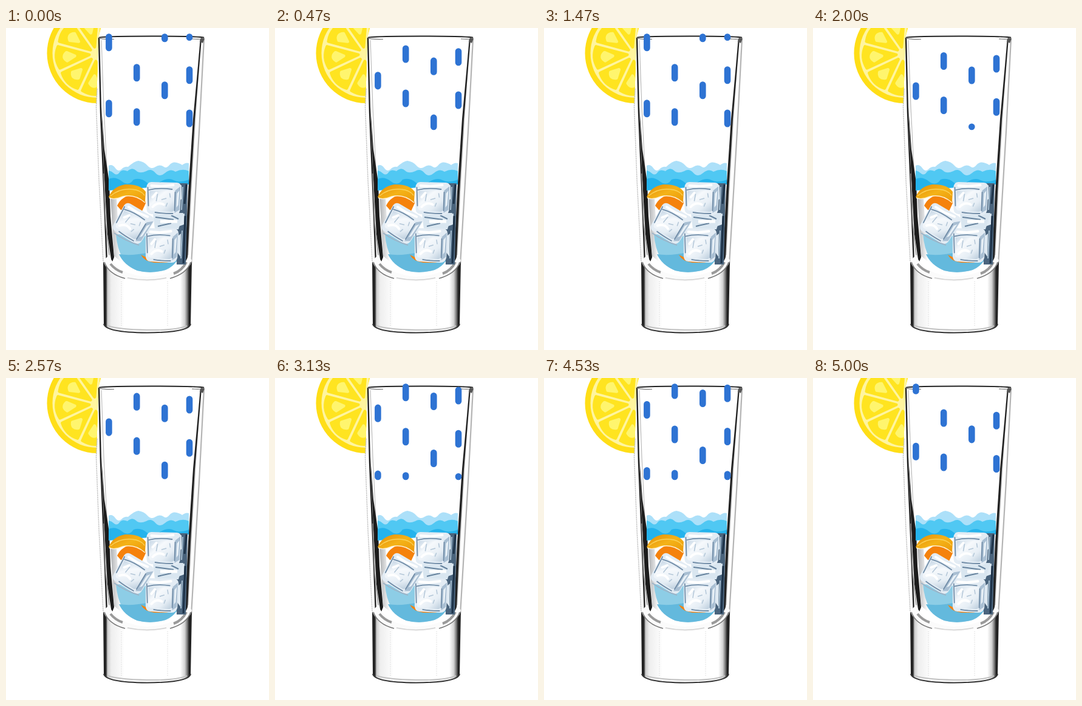
An HTML page that plays this animation: 433x531 px, repeating every 5.03 s.

```html
<!DOCTYPE html>
<html lang="en">
<head>
<meta charset="utf-8">
<title>Filling glass</title>
<style>
  html, body { margin: 0; width: 100%; height: 100%; overflow: hidden; background: #fff; }
  svg { display: block; width: 433px; height: 531px; }
  #rain path { fill: none; stroke: #2e73d3; stroke-width: 10.6; stroke-linecap: round; }
</style>
</head>
<body>
<svg viewBox="0 0 433 531" xmlns="http://www.w3.org/2000/svg">
  <defs>
    <clipPath id="besideGlass"><path d="M0 0H156L152 16 149 126 148 140H0Z"/></clipPath>
    <linearGradient id="baseShade">
      <stop offset="0" stop-color="#222"/>
      <stop offset=".03" stop-color="#222"/>
      <stop offset=".05" stop-color="#ccc"/>
      <stop offset=".09" stop-color="#eee"/>
      <stop offset=".2" stop-color="#fafafa"/>
      <stop offset=".24" stop-color="#fff"/>
      <stop offset=".87" stop-color="#fff"/>
      <stop offset=".92" stop-color="#d4d4d4"/>
      <stop offset=".95" stop-color="#777"/>
      <stop offset=".97" stop-color="#222"/>
      <stop offset="1" stop-color="#222"/>
    </linearGradient>
    <linearGradient id="wallShade">
      <stop offset="0" stop-color="#9a9da0"/>
      <stop offset="1" stop-color="#fff"/>
    </linearGradient>
    <linearGradient id="peel" x2="1" y2="1">
      <stop offset="0" stop-color="#e58c08"/>
      <stop offset=".5" stop-color="#f4b318"/>
      <stop offset="1" stop-color="#ec970a"/>
    </linearGradient>
    <linearGradient id="iceFace" x2="1" y2="1">
      <stop offset="0" stop-color="#c5d6e5"/>
      <stop offset=".35" stop-color="#f6f9fc"/>
      <stop offset=".7" stop-color="#e6eef5"/>
      <stop offset="1" stop-color="#b9cbdb"/>
    </linearGradient>
    <g id="cube" stroke-linejoin="round" stroke-linecap="round">
      <path d="M-28-19Q-27-27-20-27L22-26Q30-25 29-16L27 20Q25 28 17 28L-20 26Q-28 25-28 17Z" fill="#e3ecf4"/>
      <path d="M-23-12 13-13Q18-14 18-9L17 18Q17 22 12 22L-19 20Q-24 20-24 15Z" fill="url(#iceFace)"/>
      <path d="M19-13 28-20 26 19 18 24Z" fill="#a9bfd3"/>
      <path d="M22-8 26-13 24 11 21 15Z" fill="#e9f1f7"/>
      <path d="M-24-14Q-8-18 14-15M-26-18-25 12M19-10 18 20M-14 23Q-2 25 15 25" fill="none" stroke="#6f8ba6" stroke-width="1.8"/>
      <path d="M-20-21-4-20 16-22M-18-2-12-9M-18 14Q-10 5 0 10" fill="none" stroke="#fff" stroke-width="4"/>
      <path d="M-10-7-12 4M-3 2 4 0M6 8 4 13M10-8 11-2" fill="none" stroke="#b4c7d8" stroke-width="1.6"/>
    </g>
  </defs>
  <rect width="433" height="531" fill="#fff"/>

  <g clip-path="url(#besideGlass)">
    <circle cx="150" cy="41.5" r="82.5" fill="#ffde17"/>
    <circle cx="150" cy="41.5" r="73.5" fill="#fff59f"/>
    <g id="segments"></g>
  </g>

  <g id="walls" fill="none">
    <path d="M150 100 148.5 130 153 250 160 385" stroke="#bbb" stroke-width="1.4" stroke-dasharray="2 1"/>
    <path d="M153 16 156 140 161 260 166 388" stroke="#222" stroke-width="2.4"/>
    <path d="M157 20 161 130 167 250" stroke="#bdbdbd" stroke-width="1.2"/>
    <path d="M157 130 162 200 170 255 172 310 178 378 174 388 167 340 162 250Z" fill="#1c1c1c"/>
    <path d="M161 240 164 320 170 375" stroke="#999" stroke-width="1.6"/>
    <path d="M172 280 182 280 186 350 189 385 178 376Z" fill="url(#wallShade)" opacity=".8"/>
    <path d="M326 18 318 170 305 390" stroke="#b4b4b4" stroke-width="2.2"/>
    <path d="M320 18 312 140 305 262 299 388" stroke="#ccc" stroke-width="2"/>
    <path d="M320 18 322 18 311 150 304 270 299 380 292 392 295 370 300 270 308 150Z" fill="#222"/>
    <path d="M153 16Q158 13.5 240 13.5T326 16" stroke="#222" stroke-width="2"/>
    <path d="M153 16Q156 19 178 18.5M326 17Q322 19 306 18" stroke="#777" stroke-width="1.2"/>
    <path d="M321 16 327 17 324 25 319 22Z" fill="#555"/>
  </g>

  <g id="base" fill="none">
    <path d="M160 385Q170 413 232 418 296 413 306 385L304 489Q302 502 232 503 164 502 161 489Z" fill="url(#baseShade)"/>
    <path d="M161 383Q171 417 232 418 296 416 306 383L300 374Q294 406 232 410 180 406 170 374Z" fill="#fbfbfb"/>
    <path d="M162 386Q169 406 196 413M304 386Q298 405 270 413" stroke="#777" stroke-width="1.5"/>
    <path d="M172 389Q180 399 192 403M297 386Q290 400 276 405" stroke="#9a9a9a" stroke-width="4"/>
    <path d="M200 412Q232 419 264 412" stroke="#d0d0d0" stroke-width="1.5"/>
    <path d="M190 418V492M266 418V492" stroke="#ccc" stroke-dasharray="1 2"/>
    <path d="M161 488Q164 502 232 502.5 302 502 304 488" stroke="#333" stroke-width="2"/>
    <path d="M168 491Q184 497 232 498T298 491" stroke="#c2c2c2" stroke-width="2"/>
  </g>

  <g id="water">
    <path d="M169 227Q175 224 180 231T190 233 201 229Q212 219 218 219 227 220 233 227T246 229 260 229Q264 232 269 226T281 222 290 226Q296 221 301 223V254H169Z" fill="#ace0f9"/>
    <path d="M169 235Q174 236 178 240 183 244 187 238T200 236Q208 229 214 235T231 236Q239 231 246 239T262 239 279 237Q291 231 301 236V258H169Z" fill="#50c8f3"/>
    <path d="M169 249Q180 244 191 253T210 250Q222 246 232 255T253 254Q267 246 276 251T301 250V258L169 268Z" fill="#25b3ec"/>
    <path d="M181 340Q185 388 216 400 238 406 263 399 287 390 292 345Z" fill="#8dcde6"/>
    <path d="M186 373Q206 376 231 371L290 362Q285 390 262 399 239 406 216 400 194 391 186 373Z" fill="#63b9dd"/>
    <path d="M222 374Q235 382 266 382V387H244Q228 385 222 374Z" fill="#f4820b"/>
  </g>

  <g id="orange">
    <path d="M183 293Q190 277 211 274 228 275 230 289L224 302 189 300Z" fill="#f5820c"/>
    <path d="M169 279Q175 262 196 258 221 257 230 270L229 288Q212 273 192 278 178 284 169 279Z" fill="url(#peel)"/>
    <path d="M172 277Q187 264 207 266 222 267 228 276" fill="none" stroke="#fbd258" stroke-width="1.4"/>
    <path d="M170 280Q178 284 192 278 212 273 229 288" fill="none" stroke="#fff0cf" stroke-width="1.4"/>
  </g>

  <g id="ice">
    <path d="M279 256H299L296 390H281Z" fill="#4a647d"/>
    <path d="M283 264 289 259 289 282 283 287ZM279 309 294 306 293 324 279 329ZM283 343 288 339 287 377 282 370Z" fill="#dfeaf3"/>
    <path d="M297 258 294 290M295 310 292 388" fill="none" stroke="#1d3248" stroke-width="3"/>
    <path d="M291 262 289 300M290 334 288 380" fill="none" stroke="#a9c0d2" stroke-width="2"/>
    <path d="M242 305H292L284 332H245Z" fill="#d9e6f0"/>
    <path d="M246 312 276 316M250 327 272 322M272 309 284 315" stroke="#64819c" stroke-width="2"/>
    <path d="M254 319H282" stroke="#fff" stroke-width="5"/>
    <use href="#cube" transform="translate(259.5 281)"/>
    <use href="#cube" transform="translate(256.5 358) scale(.95 1.04)"/>
    <use href="#cube" transform="translate(209 322.5) rotate(29) scale(.98)"/>
    <path d="M178 338Q196 351 219 358" fill="none" stroke="#9cb3c7" stroke-width="2"/>
  </g>

  <g id="rain"></g>
</svg>
<script>
  const SVG_NS = "http://www.w3.org/2000/svg";
  const LOOP_MS = 5030;
  const TOP = 14.5, BOTTOM = 163, DASH = 18.5;

  function addPath(parent, attrs) {
    const path = document.createElementNS(SVG_NS, "path");
    for (const name in attrs) path.setAttribute(name, attrs[name]);
    return document.getElementById(parent).appendChild(path);
  }

  // Rounded lemon wedges fan out from the core.
  function wedge(inner, outer, width) {
    const side = outer * width;
    return `M${inner} 0L${outer - 4} ${-side}Q${outer + 5} 0 ${outer - 4} ${side}Z`;
  }
  const layers = [[12, 66, .27, "#ffe420"], [36, 53, .13, "#fff56e"]];
  for (let angle = -25; angle < 335; angle += 40) {
    const transform = `translate(149 43) rotate(${angle})`;
    for (const [inner, outer, width, color] of layers) {
      addPath("segments", {
        d: wedge(inner, outer, width), transform, fill: color,
        stroke: color, "stroke-width": 5, "stroke-linejoin": "round"
      });
    }
  }

  const columns = [
    { x: 169.4, start: 14.5, spacing: 109 },
    { x: 215.2, start: 64.5, spacing: 73 },
    { x: 261.3, start: 93.5, spacing: 94 },
    { x: 302, start: 68.5, spacing: 71.3 }
  ].map(column => ({
    ...column,
    path: addPath("rain", {
      d: `M${column.x} ${TOP}V${BOTTOM}`,
      "stroke-dasharray": `${DASH} ${column.spacing - DASH}`
    })
  }));

  // 25 steps per second shown on a 30 Hz clock; a cycle is 18 of 19 steps.
  function draw(ms) {
    const tick = Math.floor((3 * Math.floor(ms / 10) + 1) / 10);
    const step = Math.floor(tick * 5 / 6);
    const phase = (step % 18) / 19;
    for (const { path, start, spacing } of columns) {
      path.setAttribute("stroke-dashoffset", TOP - start - phase * spacing);
    }
  }

  const began = performance.now();
  function frame() {
    draw((performance.now() - began) % LOOP_MS);
    requestAnimationFrame(frame);
  }
  frame();
</script>
</body>
</html>
```
